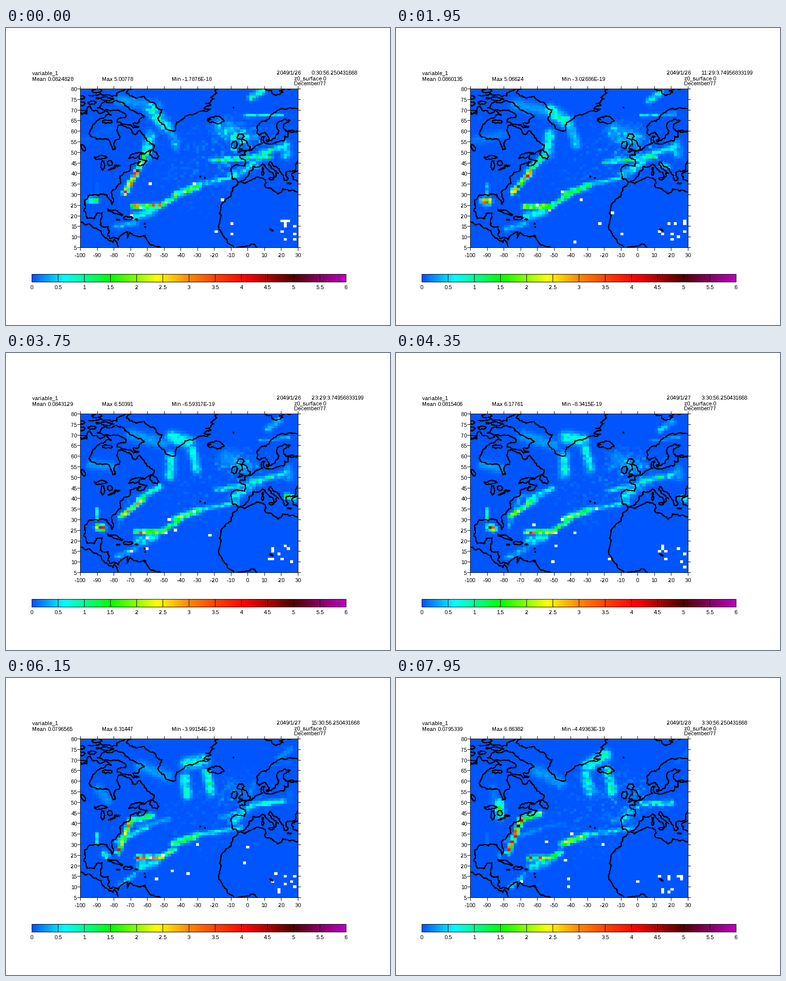
A matplotlib script for the animation above (8000 ms loop, 792 by 612 pixels).

```python
import numpy as np
import matplotlib.pyplot as plt
from matplotlib.animation import FuncAnimation
from matplotlib.colors import LinearSegmentedColormap
from matplotlib.patches import Rectangle

plt.rcParams.update({"font.family": "Liberation Sans", "font.size": 10.8, "toolbar": "None",
                     "text.antialiased": False, "text.hinting_factor": 1})
W, H, STEP, LOOP = 792, 612, 50, 8000
LEFT, RIGHT, TOP, BOTTOM = 153, 602, 124, 451
LAST = 51                                   # hours shown in one loop
rng = np.random.default_rng(4)

fig = plt.figure(figsize=(W / 72, H / 72), dpi=72, facecolor="white")
ax = fig.add_axes([0, 0, 1, 1])


def px(lon):
    return LEFT + (np.asarray(lon) + 100) * (RIGHT - LEFT) / 130


def py(lat):
    return BOTTOM - (np.asarray(lat) - 5) * (BOTTOM - TOP) / 75


def label(x, y, s, ha="left"):
    return ax.text(x, y, s, ha=ha, va="baseline")


def rule(x0, y0, x1, y1):
    ax.plot([x0, x1], [y0, y1], color="k", lw=1, antialiased=False)


stops = [(0, "#0055ff"), (.62, "#00ffff"), (1, "#00ff96"), (1.5, "#00ff00"), (2.4, "#ffff00"),
         (3, "#ff8800"), (3.5, "#ff4400"), (4.1, "#ff0000"), (5, "#500000"), (6, "#b900be")]
cmap = LinearSegmentedColormap.from_list("scale", [(v / 6, c) for v, c in stops], N=240)
cmap.set_bad("white")

# ---- weather: drifting line-shaped bands on a 1.875 x 1.25 degree grid ----
GX, GY = np.meshgrid(px(np.arange(-53, 17) * 1.875), py(np.arange(64, 3, -1) * 1.25))
noise = rng.uniform(0, 1, (7,) + GX.shape)
bands = []


def band(width, strength, start, end, peak=25, span=90):
    """Segment moving from start to end, strongest at the peak hour."""
    bands.append((width, strength, np.array(start), np.array(end), peak, span))


# Greenland and Labrador
band(12, .28, (235, 148, 310, 160), (290, 190, 340, 215))
band(11, .85, (298, 165, 330, 203), (395, 180, 432, 158))
band(8, .9, (338, 205, 350, 242), (437, 188, 446, 232), 45, 45)
band(9, .8, (297, 222, 288, 265), (390, 200, 400, 232))
# first and second front along the American coast
band(5, 1.6, (290, 255, 272, 292), (350, 300, 275, 310), 0, 30)
band(4, 4.2, (272, 292, 245, 338), (300, 310, 225, 335), 0, 30)
band(5, 2.1, (308, 300, 260, 298), (296, 278, 258, 291), 46, 12)
band(4, 4.2, (255, 297, 230, 360), (258, 290, 232, 358), 46, 12)
# subtropical band
band(4, 2.9, (262, 366, 318, 365), (275, 370, 325, 370))
band(4, 1.5, (320, 364, 365, 338), (322, 366, 340, 358))
band(5, 1.7, (350, 342, 400, 324), (342, 341, 392, 323))
band(4, .6, (400, 322, 470, 305), (400, 322, 490, 308))
band(8, .7, (265, 388, 303, 376), (280, 388, 310, 378))
band(5, .4, (225, 408, 268, 402), (235, 430, 265, 405))
# Europe and the Norwegian Sea
band(16, .4, (445, 205, 490, 225), (470, 230, 500, 242), 0, 35)
band(4, .9, (425, 272, 545, 265), (450, 292, 500, 265), 5, 40)
band(5, .7, (500, 268, 580, 240), (508, 258, 570, 256))
band(8, .5, (468, 303, 512, 280), (468, 292, 485, 272))
band(9, .5, (575, 240, 578, 260), (590, 235, 590, 250), 0, 30)
band(5, 1.5, (520, 270, 535, 275), (650, 322, 665, 326), 20, 8)
band(6, .8, (505, 142, 530, 128), (580, 172, 605, 150), 0, 35)
band(3, .6, (490, 179, 570, 178), (560, 180, 600, 168), 0, 30)
# Gulf of Mexico, Hudson Bay and the Great Lakes
band(5, 4.3, (172, 354, 186, 353), (212, 362, 214, 368), 19, 18)
band(3, 1, (187, 320, 187, 342), (187, 320, 187, 342), 27, 16)
band(10, .28, (155, 232, 225, 205), (200, 225, 205, 265), 30, 25)
band(8, 1.2, (212, 258, 215, 282), (212, 258, 215, 282), 51, 6)


def patch(x, y, rx, ry):
    return np.exp(-((GX - x) / rx) ** 2 - ((GY - y) / ry) ** 2)


def weather(hour):
    f = hour / LAST
    k, blend = divmod(f * (len(noise) - 1.001), 1)
    rough = noise[int(k)] * (1 - blend) + noise[int(k) + 1] * blend
    field = np.zeros_like(GX)
    for width, strength, start, end, peak, span in bands:
        x0, y0, x1, y1 = start + (end - start) * f
        dx, dy = x1 - x0, y1 - y0
        along = np.clip(((GX - x0) * dx + (GY - y0) * dy) / (dx * dx + dy * dy), 0, 1)
        dist2 = (GX - x0 - along * dx) ** 2 + (GY - y0 - along * dy) ** 2
        glow = strength * np.exp(-dist2 / width ** 2 - ((hour - peak) / span) ** 2)
        field = np.maximum(field, glow)
    field *= np.where(field > .3, .35 + 1.2 * rough, .7 + .5 * rough)
    field += rough ** 4 * (.15 * patch(390, 290, 90, 85) + .6 * (1 - .5 * f) * patch(490, 245, 60, 45))

    # cells without data: a cluster over the Sahel and a few strays
    r = np.random.default_rng(hour)
    field[r.integers(50, 59, 10), r.integers(60, 69, 10)] = np.nan
    field[r.integers(36, 59, 8), r.integers(16, 54, 8)] = np.nan
    return field


frame = Rectangle((LEFT, TOP), RIGHT - LEFT, BOTTOM - TOP, fc="none", ec="k", lw=1, zorder=5)
ax.add_patch(frame)
image = ax.imshow(weather(0), cmap=cmap, vmin=0, vmax=6, interpolation="nearest", aspect="auto",
                  extent=(px(-100.3125), px(30.9375), py(4.375), py(80.625)))
image.set_clip_path(frame)

# ---- coastlines: a few lon, lat points roughened by midpoint displacement ----
shore = []


def coast(*lonlat):
    p = np.reshape(lonlat, (-1, 2)).astype(float)
    p = np.column_stack([px(p[:, 0]), py(p[:, 1])])
    for _ in range(3):
        d = np.diff(p, axis=0)
        q = np.empty((2 * len(p) - 1, 2))
        q[::2] = p
        q[1::2] = (p[1:] + p[:-1]) / 2 + d[:, ::-1] * [1, -1] * rng.uniform(-.2, .2, (len(d), 1))
        p = q
    shore.extend([p, [[np.nan, np.nan]]])


def island(lon, lat, rx, ry, tilt=0):
    """Rough ellipse; tilt shifts latitude along the east-west axis."""
    a = np.linspace(0, 2 * np.pi, 8)
    coast(*np.column_stack([lon + rx * np.cos(a), lat + ry * np.sin(a) + tilt * np.cos(a)]).ravel())


# Pacific side, then the Caribbean and Gulf of Mexico
coast(-100, 16.9, -96.5, 15.7, -94.5, 16.2, -91.5, 14, -87.5, 13, -85.7, 10, -82.9, 8.2, -80.4, 7.3, -79.5, 8.9,
      -77.9, 7.2, -77.4, 5)
coast(-77.3, 8.6, -79, 9.5, -82.3, 9.2, -83.6, 10.8, -83.3, 14.8, -88, 15.7, -87.3, 20.5, -86.9, 21.4, -90.3, 21,
      -91.6, 18.6, -95.8, 18.8, -97.8, 22.4, -97.3, 27.3, -93.8, 29.7, -89.2, 29.3, -88, 30.3, -84.2, 30, -82.7, 27.8,
      -81.1, 25.2, -80.1, 26.8, -81.4, 31, -77.8, 34, -75.6, 35.4, -76.3, 38.5, -74, 40.4, -70, 42, -70, 43.8)
# Atlantic Canada, Labrador and Hudson Bay
coast(-70, 43.8, -67, 44.9, -64, 45.6, -66, 43.9, -61, 45.3, -60, 46, -64.9, 47, -64.3, 48.8, -71, 46.9, -67, 49.7,
      -60, 50.2, -56, 52.3, -55.8, 53.3, -60, 55.3, -62.5, 58.3, -64.5, 60.2, -66, 58.8, -68.5, 58.6, -70, 61,
      -73, 62.2, -77.5, 62.4, -78, 60, -76.5, 56.2, -79.6, 54.6, -79, 51.5, -80.5, 51.2, -82.3, 55, -88, 56.5,
      -92.5, 57, -94.7, 58.8, -93, 62, -91, 63.8, -86.5, 66, -81.5, 67.5, -85, 69.7, -88, 68.2, -92, 69.5,
      -94.5, 71.8, -96, 68.2, -100, 67.8)
# Baffin Island and its neighbours
coast(-65, 62, -68.5, 63.7, -65, 64, -61.7, 66.7, -67, 69, -72, 71.5, -80.5, 73.7, -85, 73.8, -89.8, 71, -85, 70,
      -79, 69.8, -73, 68, -73, 66.2, -77.8, 65.3, -78, 64.3, -71, 62.8, -65, 62)
coast(-95, 76.8, -81, 76.2, -78, 76.6, -78, 78, -75, 79, -73, 80)
island(-84, 64.4, 3, .9)
island(-85.5, 75.3, 5.5, .6, -.3)
island(-93, 73.4, 2.5, .8)
island(-99.5, 73, 2.5, 1)
island(-99, 75.8, 1.8, .8)
island(-99, 69.2, 3, .6)
island(-90, 79, 3, .9)
# Greenland, Iceland, Svalbard
coast(-65, 80, -72.5, 78, -68, 76, -62, 76.3, -56, 73.5, -54.7, 71.5, -51, 70, -53.5, 66, -52, 64, -49, 61, -43.3, 60,
      -40.5, 64.7, -33, 67.5, -25, 69.2, -22.3, 70.3, -26, 70.6, -22, 72.2, -25, 73, -20, 75.2, -22, 75.8, -18.5, 78,
      -19.5, 79.3, -17.5, 80)
coast(-24, 65.5, -22, 66.4, -16, 66.4, -14, 64.7, -18.5, 63.5, -22.5, 64, -24, 64.9, -22, 65.4, -24, 65.5)
coast(10.5, 79.8, 17, 76.8, 21, 78.3, 19, 79, 27, 80)
# Great Lakes
island(-88, 47.5, 4, .7)
island(-86.5, 43.8, 1, 2.2, .4)
island(-82.3, 44.8, 1.7, 1.3)
island(-81.2, 42.1, 2.1, .3, .6)
island(-78, 43.6, 1.7, .3)
island(-98.3, 52.1, 1.4, 1.3, -1)
# Newfoundland, Caribbean islands, northern South America
island(-56, 49, 2.8, 2, -1)
island(-63, 49.5, 1.3, .2, -.3)
island(-79.3, 21.6, 4.7, .5, -1.3)
island(-71.4, 18.9, 2.9, .8)
island(-77.3, 18.1, 1, .2)
island(-66.4, 18.2, .8, .2)
for lon, lat in ((-61.5, 16.2), (-61.2, 14.6), (-61.3, 10.5), (-28.3, 38.5), (-25.5, 37.8), (-8.5, 71)):
    island(lon, lat, .2, .2)
coast(-77.3, 8.6, -75.5, 10.7, -71.5, 12.3, -71.9, 9.5, -70, 12, -68, 10.6, -62, 10.7, -60, 8.4, -57, 6, -52.2, 5)
# Scandinavia and the Baltic
coast(30, 70.5, 25, 71, 17, 69, 13, 66, 11, 64.5, 5.5, 62, 5.5, 59, 7, 58.1, 10.5, 59.4, 12.9, 55.4, 14.2, 55.5,
      16.7, 57.8, 18.8, 60, 17.2, 62.3, 22.2, 65.7, 25.3, 65, 21.3, 62.5, 21.5, 61, 23, 59.9, 30, 60)
coast(30, 59.8, 24, 59.3, 24, 57.1, 22, 57.6, 21.1, 55.3, 17, 54.7, 14.3, 53.9, 11, 54, 9.6, 55.3, 10.4, 57.6,
      8.3, 56.9, 8.8, 54.2, 4.7, 52.9, 1.6, 50.8, -1.9, 49.7, -1.4, 48.7, -4.7, 48.4, -1.2, 46, -1.8, 43.4, -8, 43.7,
      -9.2, 43, -9.4, 38.7, -8.8, 37.1, -7, 37.2, -6, 36.1, -2.1, 36.8, .2, 38.8, .8, 40.8, 3.2, 41.9)
# northern Mediterranean
coast(3.2, 41.9, 3.1, 43.1, 6.5, 43.1, 8.8, 44.4, 10.5, 42.9, 15.2, 40.1, 15.7, 38, 17.1, 39.1, 16.9, 40.4, 18.4, 39.9,
      14, 42.6, 12.4, 44.3, 13.7, 45.6, 19, 42, 19.4, 40.8, 21.7, 36.9, 23.1, 36.5, 24, 37.8, 22.8, 40.4, 26, 40.8,
      28, 41, 28.6, 43.8, 30, 46)
coast(30, 41.2, 27.3, 40.4, 26.2, 39.5, 27.3, 37, 30, 36.2)
coast(-5.7, 50.1, -1, 50.7, 1.3, 51.1, 1.7, 52.6, .2, 53, -1.6, 55.5, -3.2, 56, -2, 57.5, -3.1, 58.6, -5, 58.5,
      -6.2, 56.5, -3.2, 54.9, -3, 53.4, -4.5, 53.2, -5.2, 51.8, -3, 51.4, -5.7, 50.1)
island(-7.9, 53.4, 1.9, 1.7, .5)
island(14.1, 37.5, 1.5, .6)
island(9, 40, .6, 1)
island(9, 42.2, .4, .7)
island(24.8, 35.2, 1.2, .2)
island(11.8, 55.4, .7, .5)
# Africa
coast(30, 31.3, 25, 31.6, 20.8, 32.8, 20, 31, 18, 30.3, 15.4, 31.8, 11, 33.2, 10, 34.2, 11, 35.5, 9.8, 37.3, 1, 36.5,
      -2, 35.1, -5.4, 35.9, -6.9, 34, -9.8, 31, -9.6, 29.8, -12.9, 27.8, -16, 23.7, -17, 21.2, -16.3, 18, -17.4, 14.7,
      -15, 11, -11.5, 6.9, -8, 4.6, -4, 5.2, 0, 5.6, 4, 6.4, 5.5, 5)
island(14.2, 13.2, .9, .3, -.4)

line, = ax.plot(*np.vstack(shore).T, color="k", lw=1.4, antialiased=False)
line.set_clip_path(frame)

# ---- axes, colour bar and fixed labels ----
for lon in range(-100, 31, 10):
    x = px(lon)
    rule(x, TOP - 5, x, TOP)
    rule(x, BOTTOM, x, BOTTOM + 6)
    label(x, 471, str(lon), "center")
for lat in range(5, 81, 5):
    y = py(lat)
    rule(LEFT - 6, y, LEFT, y)
    rule(RIGHT, y, RIGHT + 5, y)
    label(146.5, y + 5, str(lat), "right")

ax.imshow(np.linspace(0, 6, 648)[None], cmap=cmap, vmin=0, vmax=6, aspect="auto",
          extent=(53, 701, 522, 506))
ax.add_patch(Rectangle((53, 506), 648, 16, fc="none", ec="k", lw=1))
for i in range(13):
    x = 53 + 54 * i
    rule(x, 506, x, 522)
    label(x + .5, 537, f"{i / 2:g}", "center")

label(54, 95, "variable_1")
label(594, 106, "z0_surface 0")
label(594, 117, "December/77")
date, clock = label(558, 95, ""), label(630, 95, "")

KEYS = [0, 6, 11, 18, 27, 39, 51]
stats = [
    (label(54, 108, ""), "Mean", [.0824828, .0859118, .0860135, .0877783, .0815406, .0796565, .0795339]),
    (label(198, 108, ""), "Max", [5.00778, 5.10724, 5.06624, 6.91179, 6.17761, 6.31447, 6.86382]),
    (label(342, 108, ""), "Min", [-1.7876e-18, -5.03381e-19, -3.02686e-19, -4.40776e-19, -8.3415e-19,
                                  -3.99154e-19, -4.49363e-19])]
MINUTES = ["30:56.250431668", "30:0", "29:3.74956833199"]   # rounding of the time axis

# unit pixels, with snapped lines landing on their own row and column
ax.set(xlim=(0, W), ylim=(H - 1, -1))
ax.axis("off")


def update(i):
    t = i * STEP
    hour = 0 if t < 450 else (t - 450) // 150 + 1
    image.set_data(np.ma.masked_invalid(weather(hour)))
    for text, name, values in stats:
        text.set_text(f"{name} " + f"{np.interp(hour, KEYS, values):.6g}".upper())
    date.set_text(f"2049/1/{26 + hour // 24}")
    clock.set_text(f"{hour % 24}:{MINUTES[hour % 3]}")


anim = FuncAnimation(fig, update, frames=LOOP // STEP, interval=STEP, repeat=True, repeat_delay=0)
plt.show()
```
